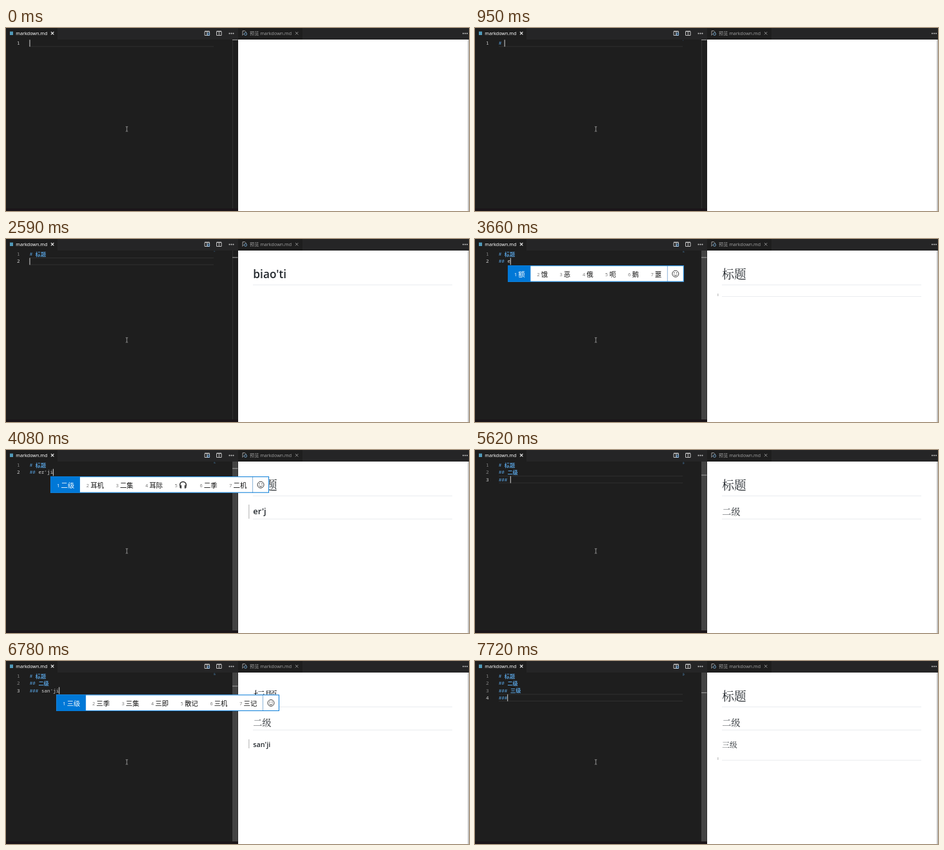
Write an HTML page that moves like this. It is 720 px wide and 285 px high and loops after 8 s.

```html
<!DOCTYPE html>
<html lang="zh-CN">
<head>
<meta charset="utf-8">
<title>Markdown live preview</title>
<style>
html, body { margin: 0; width: 100%; height: 100%; overflow: hidden; background: #1e1e1e; }
svg { display: block; width: 100vw; height: 100vh; }
text { white-space: pre; }
.ui { font: 7.15px "Noto Sans", "Open Sans", "Noto Sans CJK SC", "Noto Sans CJK", sans-serif; }
.code { font: 7.62px "Noto Sans Mono", "DejaVu Sans Mono", "Noto Sans CJK SC", monospace; }
.cjk { font-family: "Noto Sans CJK SC", "Noto Sans CJK", sans-serif; }
.head { font-family: "Open Sans", "Noto Sans", sans-serif; font-weight: 600; fill: #24292e; }
.song { font-family: "Noto Serif CJK SC", "Noto Sans CJK SC", "Noto Sans CJK", sans-serif; font-weight: 400; fill: #24292e; }
</style>
</head>
<body>
<svg viewBox="0 0 720 285" preserveAspectRatio="none">
  <rect width="720" height="285" fill="#1e1e1e"/>
  <rect width="720" height="18" fill="#252526"/>
  <rect width="80" height="18" fill="#1e1e1e"/>
  <rect x="361" width="100" height="18" fill="#1e1e1e"/>
  <rect y="281" width="361" height="4" fill="#1b1519"/>
  <rect x="6" y="5.5" width="5" height="5.5" fill="#519aba"/>
  <text class="ui" x="15.3" y="11" fill="#fff" font-weight="500">markdown.md</text>
  <text class="ui" x="379" y="11" fill="#9a9a9a">预览 markdown.md</text>
  <g fill="none" stroke-width="1">
    <path d="M70 6l4.4 4.4m0-4.4l-4.4 4.4" stroke="#e8e8e8" stroke-width="1.1"/>
    <path d="M450 6l4.4 4.4m0-4.4l-4.4 4.4" stroke="#8c8c8c"/>
    <g stroke="#c5c5c5">
      <path d="M309 5.5h7.5v6h-7.5zM309 5h7.5M312.8 5.5v6"/>
      <path d="M327.5 5.5h7.500v6h-7.500zM327.500 5h7.500M331.3 5.500v6"/>
    </g>
    <circle cx="315" cy="9.5" r="1.7" stroke="#75beff" fill="#252526"/>
    <path d="M368 11V4.500h3.500l2 2V7M367.500 11.500l2-2" stroke="#9a9a9a"/>
    <circle cx="372.500" cy="9.300" r="2" stroke="#75a8cf"/>
  </g>
  <g fill="#d0d0d0" id="dots"></g>
  <rect x="361" y="18" width="359" height="267" fill="#fff"/>
  <rect x="718" y="18" width="2" height="267" fill="#c4c4c4"/>
  <g id="stage"></g>
  <path d="M186.300 153.700h1.200l.4 .5l.4-.5h1.200M187.900 154v6.500M186.300 161h1.200l.4-.5l.4 .5h1.200" fill="none" stroke="#b5b5b5" stroke-width=".8"/>
</svg>
<script>
const LOOP = 8000, ADV = 4.572, LEFT = 36.7, PITCH = 11.2;
const stage = document.getElementById('stage');
const isCjk = c => c > '\u2e80';

// Editor text over time; "|" opens the part still being composed.
const T1 = '# 标题', T2 = T1 + '\n## 二级', T3 = T2 + '\n### 三级';
const edits = [
  [-305, ''], [400, '#'], [950, '# '],
  [1500, '# |b'], [1570, '# |bi'], [1650, "# |bi'a"], [1800, '# |biao'],
  [1880, "# |biao't"], [1960, "# |biao'ti"], [2270, T1],
  [2590, T1 + '\n'], [3120, T1 + '\n#'], [3200, T1 + '\n##'], [3430, T1 + '\n## '],
  [3660, T1 + '\n## |e'], [3740, T1 + '\n## |er'], [3900, T1 + "\n## |er'j"],
  [4080, T1 + "\n## |er'ji"], [4380, T2],
  [4760, T2 + '\n'], [5150, T2 + '\n#'], [5230, T2 + '\n##'], [5310, T2 + '\n###'], [5620, T2 + '\n### '],
  [5930, T2 + '\n### |s'], [6010, T2 + '\n### |sa'], [6250, T2 + '\n### |san'],
  [6390, T2 + "\n### |san'j"], [6470, T2 + "\n### |san'ji"], [6850, T3],
  [7080, T3 + '\n'], [7400, T3 + '\n#'], [7490, T3 + '\n##'], [7720, T3 + '\n###']
];

// The preview trails the editor.
const views = [
  [0, ''], [1570, '# b'], [1650, '# bi'], [1730, "# bi'a"], [1960, "# biao'ti"],
  [2660, T1], [3280, T1 + '\n## '], [3820, T1 + '\n## er'], [3990, T1 + "\n## er'j"],
  [4450, T1 + "\n## er'ji"], [4840, T2], [5310, T2 + '\n## '], [5390, T2],
  [6090, T2 + '\n### s'], [6170, T2 + '\n### sa'], [6390, T2 + '\n### san'],
  [6550, T2 + "\n### san'ji"], [7150, T3], [7570, T3 + '\n## ']
];

const words = {
  "b": '不 吧 把 被 比 别 本', "bi": '比 笔 必 币 闭 鼻 避',
  "bi'a": '比啊 便 表 边 变 标 编', "biao": '表 标 彪 镖 飙 膘 裱',
  "biao't": '标题 表态 表 标 彪 镖 飙', "biao'ti": '标题 表体 标体 表题 标提 表提 彪体',
  "e": '额 饿 恶 俄 呃 鹅 噩', "er": '二 而 儿 耳 尔 饵 贰',
  "er'j": '二级 二 而 儿 耳 尔 饵', "er'ji": '二级 耳机 二集 耳际 @phones 二季 二机',
  "s": '是 三 说 上 时 谁 四', "sa": '撒 洒 萨 仨 飒 卅 趿',
  "san": '三 散 伞 叁 @brolly 潵 馓', "san'j": '三级 三 散 伞 叁 潵 馓',
  "san'ji": '三级 三季 三集 三即 散记 三机 三记'
};

const icons = {
  phones: '<path d="M1.500 6.500V5a4.800 4.800 0 0 1 9.600 0v1.500" fill="none" stroke="#222" stroke-width="1.5"/>' +
    '<path d="M1 5.500h3v5h-2l-1-1.500zM11.600 5.500h-3v5h2l1-1.500z" fill="#444"/>',
  brolly: '<path d="M1 1.800l2-1l7 5l1.500 5.200l-5-1.500z" fill="#bd6418" stroke="#46220c" stroke-width=".8"/>' +
    '<path d="M2.500 1.500l8 8.500" stroke="#6b3512" stroke-width=".7"/><circle cx="1.500" cy="1.200" r="1.100" fill="#333"/>'
};

const rect = (x, y, w, h, fill, extra = '') =>
  `<rect x="${x}" y="${y}" width="${w}" height="${h}" fill="${fill}" ${extra}/>`;
const text = (x, y, s, attrs) => `<text x="${x}" y="${y}" ${attrs}>${s}</text>`;
const at = (list, t) => list.filter(e => e[0] <= t).pop();
const width = s => [...s].reduce((w, c) => w + (isCjk(c) ? 8.2 : ADV), 0);

function codeLine(raw, y) {
  const [done, draft = ''] = raw.split('|');
  const cut = [...done].findIndex(isCjk);
  const ascii = cut < 0 ? done : done.slice(0, cut);
  const han = cut < 0 ? '' : done.slice(cut);
  const blue = 'fill="#569cd6" font-weight="700"';
  return text(LEFT, y, ascii, 'class="code" ' + blue) +
    (han && text(LEFT + width(ascii), y + .3, han, 'class="cjk" font-size="8.2" ' + blue)) +
    (draft && text(LEFT + width(done), y, draft, 'class="code" fill="#d4d4d4"'));
}

function editor(src, caretOn, slider) {
  const lines = src.split('\n'), last = lines.length - 1;
  const top = 18 + last * PITCH, end = LEFT + width(lines[last].replace('|', ''));
  let out = '';
  if (!src.includes('|')) {
    if (last) out += rect(37, top - .2, 286, 1, '#303030');
    out += rect(37, top + 10.3, 286, 1, '#303030');
  }
  lines.forEach((s, i) => {
    const y = 26.2 + i * PITCH;
    out += text(21.500, y, i + 1, `class="code" text-anchor="end" fill="${i === last ? '#d0d0d0' : '#858585'}"`);
    out += codeLine(s, y);
    if (s) out += rect(323, 18.8 + i * 1.100, Math.min(3, s.length * .55), .7, '#569cd6', 'opacity=".5"');
  });
  out += rect(352, 18, 1, 263, '#303030');
  if (slider) out += rect(352, 18, 8.500, 263, '#434343');
  out += rect(352, 18 + last * 10.3, 8.500, 1, '#a3a3a3');
  if (caretOn) out += rect(end - .2, top + .3, 1, 10.8, '#d4d4d4');
  return out;
}

function preview(md) {
  const tops = [45, 85, 122, 150], base = [61, 100, 134, 163];
  const size = { 1: 18.800, 2: 14.100, 3: 11.750 }, rows = md ? md.split('\n') : [];
  let out = '';
  rows.forEach((row, i) => {
    const level = row.indexOf(' '), s = row.slice(level + 1), han = isCjk(s);
    if (s) out += text(384.300, base[i] + (han ? .8 : 0), s,
      `class="${han ? 'song' : 'head'}" font-size="${size[level] * (han ? 1 : .92)}"`);
    const foot = s ? [71, 107, 136][i] : tops[i] + 4;
    if (level < 3) out += rect(384, foot, 310, 1, '#eaecef');
    const active = i && i === rows.length - 1 && !(han && s);
    if (active) out += rect(377, tops[i], 1.500, foot - tops[i], '#c9c9c9');
  });
  return out;
}

function picker(src) {
  const draft = src.split('|')[1];
  if (!draft) return '';
  const lines = src.split('\n'), row = lines.length - 1;
  const x0 = LEFT + width(lines[row].replace('|', '')) - 4;
  const y = 30 + row * PITCH, mid = y + 13;
  let x = x0, cells = '';
  words[draft].split(' ').forEach((w, i) => {
    const icon = w[0] === '@' && icons[w.slice(1)];
    const wide = icon ? 39 : 25 + w.length * 10.4;
    if (!i) cells += rect(x, y, wide, 25.500, '#0078d7');
    cells += text(x + 10, mid + 4, i + 1, `class="ui" fill="${i ? '#7a7a7a' : '#fff'}"`);
    cells += icon ? `<g transform="translate(${x + 16.500} ${mid - 5})">${icon}</g>`
      : text(x + 16.300, mid + 4.300, w, `class="cjk" font-size="10.4" font-weight="${i ? 400 : 500}" fill="${i ? '#111' : '#fff'}"`);
    x += wide;
  });
  const cx = x + 13;
  return rect(x0, y, x + 26 - x0, 25.500, '#fff') + cells +
    rect(x, y, 1, 25.500, '#8cb4d8') +
    `<g fill="none" stroke="#222" stroke-width=".9"><circle cx="${cx}" cy="${mid}" r="5"/>` +
    `<path d="M${cx - 2.700} ${mid + 1.200}q2.700 3.200 5.400 0"/></g>` +
    [-1.800, 1.800].map(d => `<circle cx="${cx + d}" cy="${mid - 1.500}" r=".75" fill="#222"/>`).join('') +
    rect(x0 + .5, y + .5, x + 25 - x0, 24.500, 'none', 'stroke="#0078d7"');
}

document.getElementById('dots').innerHTML =
  [347.500, 350.500, 353.500, 711, 714, 717].map(x => `<circle cx="${x}" cy="8.500" r="1"/>`).join('');

let shown;
function draw(t) {
  const [since, src] = at(edits, t), md = at(views, t)[1];
  const caretOn = (t - since) % 950 < 475, slider = t >= 2660;
  const key = [src, md, caretOn, slider].join();
  if (key === shown) return;
  shown = key;
  stage.innerHTML = editor(src, caretOn, slider) + preview(md) + picker(src);
}

const start = performance.now();
function tick() {
  draw((performance.now() - start) % LOOP);
  requestAnimationFrame(tick);
}
tick();
</script>
</body>
</html>
```
